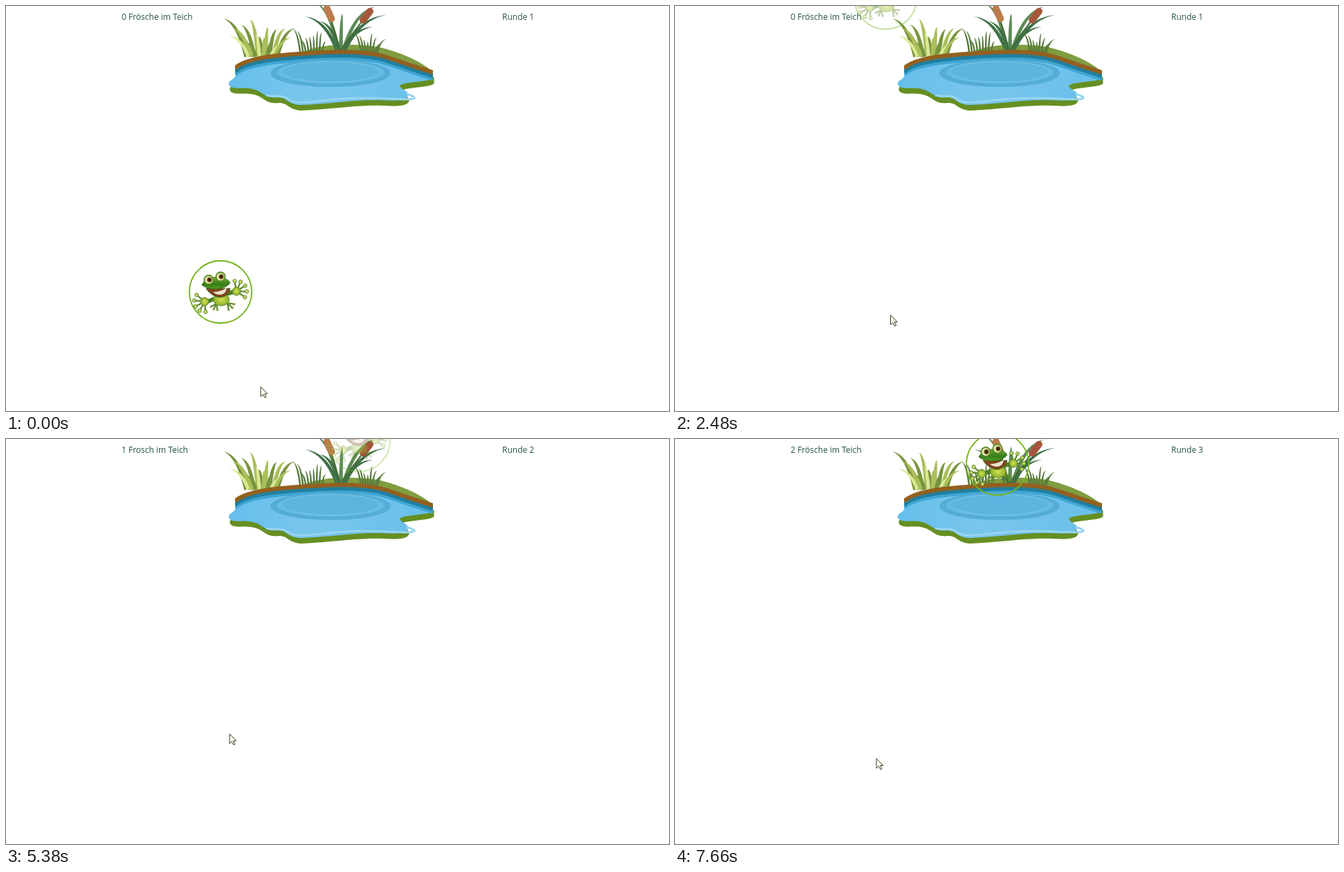
Write an HTML page that moves like this. It is 958 px wide and 585 px high and loops after 8000 ms.

```html
<!DOCTYPE html>
<html lang="de">
<head>
<meta charset="utf-8">
<title>Froschteich</title>
<style>
html, body { margin: 0; width: 100%; height: 100%; overflow: hidden; background: #fff; }
svg { display: block; width: 100%; height: 100%; }
text { font: 12px "Open Sans", "Noto Sans", sans-serif; fill: #24553a; }
</style>
</head>
<body>
<svg viewBox="0 0 958 585">
  <defs>
    <linearGradient id="blue">
      <stop offset="0" stop-color="#65bfeb"/><stop offset=".4" stop-color="#79c6ec"/><stop offset="1" stop-color="#68bfea"/>
    </linearGradient>
    <linearGradient id="skin" x2="0" y2="1">
      <stop offset="0" stop-color="#72ad2e"/><stop offset=".6" stop-color="#347c1a"/><stop offset="1" stop-color="#56a01f"/>
    </linearGradient>
    <radialGradient id="belly"><stop offset="0" stop-color="#d5e350"/><stop offset="1" stop-color="#8bae2d"/></radialGradient>
    <path id="water" d="M331 88C350 74 395 72 440 67H520C550 72 580 86 617 95V104C612 110 575 109 569 115C570 121 582 122 581 129C579 137 562 137 545 136C510 134 465 142 425 143C406 142 407 132 393 132C376 134 374 127 363 122C350 116 338 120 328 118Q321 116 322 111C323 106 335 105 331 95Z"/>
    <path id="rim" d="M331 90C347 74 395 71 440 68S525 66 547 73S590 88 617 96"/>
    <clipPath id="shore"><path d="M331 0H617V150H331Z"/></clipPath>
  </defs>
  <text id="count" x="167" y="20"></text>
  <text id="round" x="717" y="20"></text>

  <path fill="#7f9d40" d="M425 68Q450 57 480 56T538 59Q590 72 617 95L540 76Z"/>
  <g id="plants"></g>
  <use href="#water" x="1.5" y="8" fill="#668f22"/>
  <use href="#water" fill="url(#blue)"/>
  <g fill="none" stroke-width="6" clip-path="url(#shore)">
    <use href="#rim" y="9" stroke="#3ea5d2"/>
    <use href="#rim" y="5" stroke="#227f9f"/>
    <use href="#rim" stroke="#93601f"/>
  </g>
  <path fill="none" stroke="#98d5f2" stroke-width="3" d="M376 129C392 132 400 128 407 134C416 142 435 139 455 137Q500 131 555 134T579 127"/>
  <ellipse cx="469" cy="97" rx="87" ry="20" fill="#54add7"/>
  <ellipse cx="469" cy="96" rx="79" ry="17" fill="#62b9e1" stroke="#4fa8d3"/>
  <ellipse cx="469" cy="95" rx="71" ry="15" fill="#5bb5df" stroke="#79c6e8"/>

  <g id="frog">
    <circle r="45" fill="none" stroke="#74b41e" stroke-width="1.8"/>
    <g id="limbs"></g>
    <ellipse cx="1" cy="11" rx="11.5" ry="9" fill="url(#belly)" stroke="#5d8c25"/>
    <path fill="#83431f" stroke="#3c641a" d="M-21 -5H14Q12 6 0 8Q-13 7 -21 -5Z"/>
    <path fill="#e9e3cf" d="M-11 0Q0 0 9 -6Q8 3 0 4Q-7 4 -11 0Z"/>
    <path fill="url(#skin)" stroke="#35651b" stroke-width=".8" d="M-27 -10C-24 -16 -20 -21 -10 -21S11 -20 14 -13C7 -3 -16 -1 -27 -10Z"/>
    <g id="eyes"></g>
  </g>
  <circle id="press" r="13" cy="1" fill="#ff0" opacity="0.6"/>
  <path id="cursor" fill="#fffef2" stroke="#303a20" d="M.5 .5V14.5L3.8 11.4L6.4 16.4L8.5 15.4L6.2 10.5H10.2Z"/>
</svg>
<script>
const $ = id => document.getElementById(id);
const clamp = v => Math.min(1, Math.max(0, v));
const mix = (a, b, p) => a.map((v, i) => v + (b[i] - v) * p);

let seed = 11;
const random = () => (seed = seed * 16807 % 2147483647) / 2147483647;

// Tapered leaf that rises from its base and bows over to the tip
function leaf(x, y, tx, ty, w, color) {
  const dx = tx - x, dy = ty - y, len = Math.hypot(dx, dy), nx = -dy / len * w, ny = dx / len * w;
  const cx = x + dx * .35, cy = y + dy * .9;
  return `<path fill="${color}" d="M${x - nx} ${y - ny}Q${cx - nx} ${cy - ny} ${tx} ${ty}Q${cx + nx} ${cy + ny} ${x + nx} ${y + ny}Z"/>`;
}
// Leaves spread from a base range to a tip range; tips lie between two heights
function clump(n, y, base, tips, heights, w, colors) {
  let out = '';
  for (let i = 0; i < n; i++) {
    const u = i / (n - 1), at = ([a, b], p) => a + (b - a) * p;
    out += leaf(at(base, u), y, at(tips, u), at(heights, random()), w, colors[i % colors.length]);
  }
  return out;
}
const cattail = (x, y, turn, color) =>
  `<path fill="none" stroke="#426b35" stroke-width="2" d="M483 66Q${(x + 966) / 3} 45 ${x} ${y}"/>
   <rect x="-5" y="-13" width="10" height="26" rx="5" fill="${color}" transform="translate(${x} ${y}) rotate(${turn})"/>`;
const reeds = [[432, 15], [447, -4], [453, 22], [486, 11], [530, 30], [536, 0], [549, 13]];

$('plants').innerHTML =
  clump(9, 73, [347, 392], [314, 417], [18, 48], 3, ['#78943f', '#a9bf5a']) +
  clump(8, 73, [350, 388], [322, 412], [36, 60], 2.5, ['#dce994', '#a9bf5a', '#78943f']) +
  clump(9, 66, [425, 457], [414, 462], [30, 56], 1.3, ['#56793a']) +
  clump(8, 68, [513, 536], [503, 549], [39, 56], 1.3, ['#56793a']) +
  reeds.map(([x, y], i) => leaf(479 + i * 1.6, 66, x, y, 2.7, i % 2 ? '#5b8a56' : '#3f7146')).join('') +
  cattail(467, 11, -24, '#bd7c4c') + cattail(521, 14, 38, '#a6573b');

// A palm with a fan of padded fingers; angles in degrees
function hand(x, y, r, n, from, to, len, pad) {
  let out = '';
  for (let i = 0; i < n; i++) {
    const a = (from + (to - from) * i / (n - 1)) * Math.PI / 180;
    const tx = x + len * Math.cos(a), ty = y + len * Math.sin(a);
    out += `<path stroke-width="2.2" d="M${x} ${y}L${tx} ${ty}"/><circle cx="${tx}" cy="${ty}" r="${pad}"/>`;
  }
  return out + `<circle cx="${x}" cy="${y}" r="${r}" fill="url(#belly)"/>`;
}
$('limbs').innerHTML = `<path fill="none" stroke="#4d8222" stroke-width="6" d="M-9 10L-22 15M8 3L22 -1"/>
  <g fill="#c6d86a" stroke="#5b8529">` +
  hand(23, -1, 6, 5, -100, 35, 15, 2.6) + hand(-23, 14, 6, 5, 220, 85, 15, 2.6) +
  hand(-6, 17, 2, 3, 150, 80, 9, 1.2) + hand(10, 16, 2, 3, 80, 10, 10, 1.2) + '</g>';
$('eyes').innerHTML = [[-17, -17.5], [0, -22]].map(([x, y]) =>
  `<g transform="translate(${x} ${y})"><circle r="7.5" fill="#568d25"/><circle r="5.6" fill="#f0e9bd"/>
   <circle r="3.7" cx="1" fill="#80611f"/><circle r="2.2" cx="1" fill="#251f10"/></g>`).join('');

const rounds = [
  { jump: 752, from: [310, 413], to: [304.3, -11.5], move: [80, 660], at: [311, 446], text: '0 Frösche' },
  { jump: 3590, from: [335, 396], to: [510, 2], move: [3200, 3450], at: [322.5, 425.5], text: '1 Frosch' },
  { jump: 6620, from: [304, 431], to: [466, 36], move: [5840, 6480], at: [290.5, 461], text: '2 Frösche' }
];
const place = (id, p) => $(id).setAttribute('transform', `translate(${p})`);

// cubic-bezier(.25, .1, .25, 1)
function ease(t) {
  let lo = 0, hi = 1, s;
  for (let i = 0; i < 24; i++) {
    s = (lo + hi) / 2;
    if (.75 * s * (1 - s) + s ** 3 < t) lo = s; else hi = s;
  }
  return .3 * s * (1 - s) ** 2 + 3 * s * s * (1 - s) + s ** 3;
}

function draw(t) {
  const n = rounds.filter(r => t >= r.jump + 2455).length, r = rounds[n];
  place('frog', mix(r.from, r.to, ease(clamp((t - r.jump) / 1000))));
  $('frog').setAttribute('opacity', 1 - ease(clamp((t - r.jump - 1400) / 1000)));
  $('count').textContent = r.text + ' im Teich';
  $('round').textContent = 'Runde ' + (n + 1);

  let tip = [367.5, 549.5];
  for (const { move: [a, b], at } of rounds) {
    const p = clamp((t - a) / (b - a));
    tip = mix(tip, at, p * p * (3 - 2 * p));
  }
  place('cursor', tip);
  place('press', tip);
  $('press').style.display = t > r.jump - 120 && t < r.jump ? '' : 'none';
}

const start = performance.now();
function tick() {
  draw((performance.now() - start) % 8000);
  requestAnimationFrame(tick);
}
tick();
</script>
</body>
</html>
```
